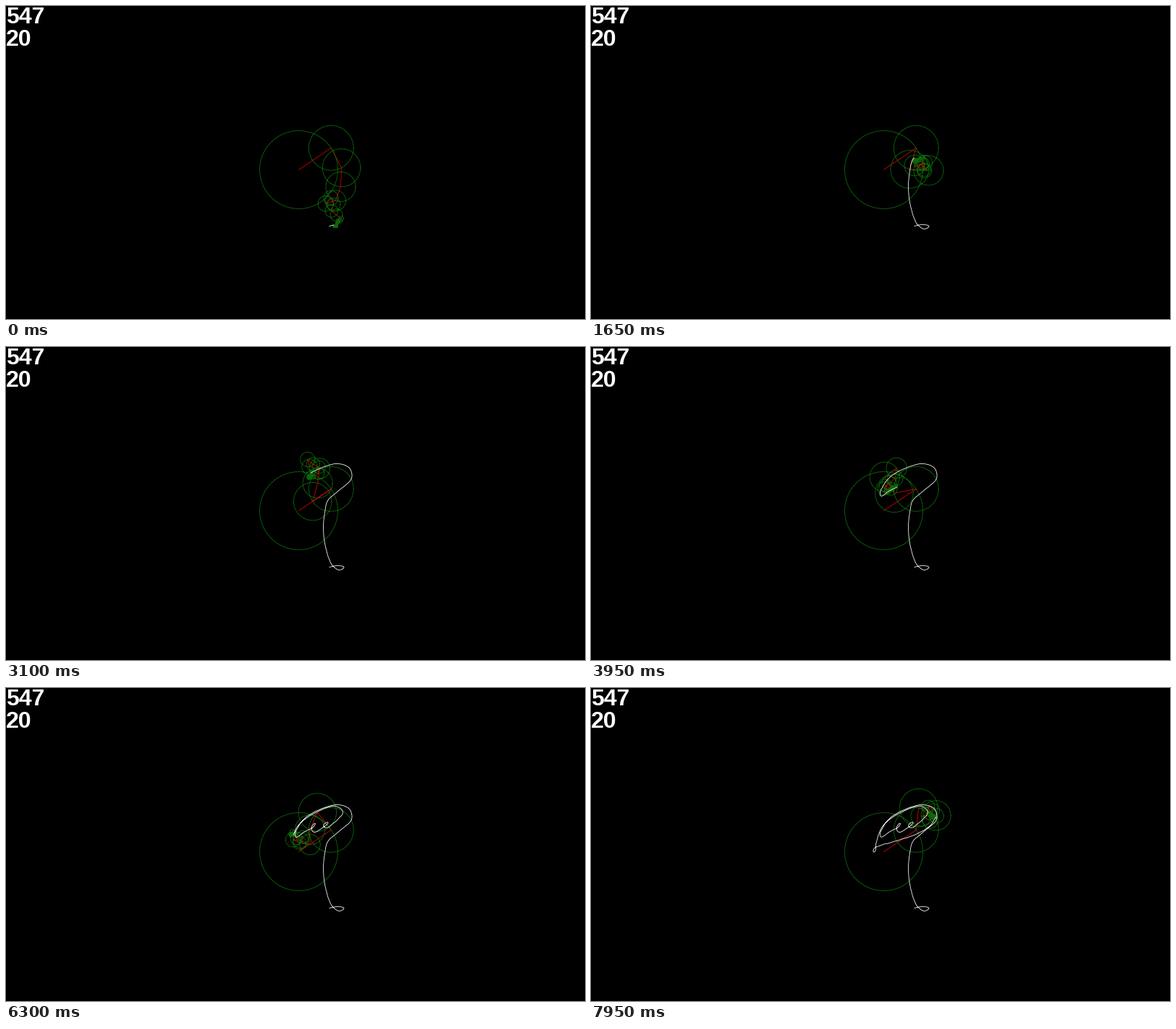
Recreate the animation shown at these times as a matplotlib script. Size 800x433 px, loop 8 s.

```python
import numpy as np
import matplotlib.pyplot as plt
from matplotlib.animation import FuncAnimation

W, H, DPI = 800, 433, 100
FRAMES, STEP_MS = 160, 50
PX = 72 / DPI
ORDER = 80                        # highest frequency kept
ORIGIN = 404 + 226j
START, END = np.radians([-2.1, 214])    # arm angles where the pen path lies

# Key points of the pen stroke, walked at constant speed.
STROKE = [
    (446, 304), (457, 302), (467, 304), (460, 308), (450, 301), (441, 276),
    (438, 250), (440, 228), (444, 212), (457, 200), (477, 181), (474, 167),
    (458, 161), (432, 168), (411, 181), (399, 201), (400, 206), (411, 199),
    (425, 191), (427, 186), (422, 192), (424, 199), (441, 190), (445, 185),
    (438, 189), (441, 193), (455, 184), (465, 171), (455, 163), (425, 173),
    (403, 190), (395, 208), (391, 227), (389, 225), (393, 220), (418, 212),
    (448, 202), (468, 190), (476, 178)]

# Longest arms: frequency -> (length, start angle in degrees)
ARMS = {1: (30, 60), -2: (26.5, 91.5), 2: (20.5, 113), -4: (14, 162)}


def spline(p, samples=12):
    """Smooth centripetal curve through complex points."""
    h = np.sqrt(np.abs(np.diff(p)))
    m = np.gradient(p, np.append(0, np.cumsum(h)))
    t = np.arange(samples)[:, None] / samples
    curve = ((2*t**3 - 3*t**2 + 1) * p[:-1] + (t**3 - 2*t**2 + t) * h * m[:-1]
             + (3*t**2 - 2*t**3) * p[1:] + (t**3 - t**2) * h * m[1:])
    return np.append(curve.T.ravel(), p[-1])


def fit_arms():
    """Fourier terms that follow the stroke and keep the longest arms."""
    z = spline(np.array([complex(*p) for p in STROKE]))
    length = np.append(0, np.cumsum(np.abs(np.diff(z))))
    angle = START + (END - START) * length / length[-1]

    n = np.arange(-ORDER, ORDER + 1)
    mean = np.zeros(len(n), complex)
    tol = 8 / (1 + (n / 6)**2)**0.75
    mean[ORDER], tol[ORDER] = 45 - 30j, 0.3
    for k, (r, a) in ARMS.items():
        mean[k + ORDER] = r * np.exp(1j * np.radians(a))
        tol[k + ORDER] = 0.6

    basis = np.exp(1j * np.outer(angle, n)) / 0.5
    lhs = basis.conj().T @ basis + np.diag(1 / tol**2)
    rhs = basis.conj().T @ ((z - ORIGIN) / 0.5) + mean / tol**2
    coef = np.linalg.solve(lhs, rhs)
    main = [0, *ARMS]
    rest = sorted(set(n) - set(main), key=lambda k: -abs(coef[k + ORDER]))
    freq = np.array(main + rest)
    return freq, coef[freq + ORDER]


FREQ, COEF = fit_arms()
RING = np.append(np.exp(2j * np.pi * np.arange(73) / 72), np.nan)


def set_line(line, z):
    line.set_data(z.real, z.imag)


fig = plt.figure(figsize=(W / DPI, H / DPI), dpi=DPI, facecolor="black")
ax = fig.add_axes([0, 0, 1, 1])
ax.set_xlim(-0.5, W - 0.5)
ax.set_ylim(H - 0.5, -0.5)
ax.axis("off")

arm_line, = ax.plot([], [], color="#d00000", lw=0.85 * PX)
rings, = ax.plot([], [], color="#0a680a", lw=0.85 * PX)
trail, = ax.plot([], [], color="white", lw=0.8 * PX)
for label, y in (("547", 23), ("20", 54.5)):
    ax.text(-0.5, y, label, color="white", family="Liberation Sans",
            weight="bold", size=32 * PX, va="baseline")


def draw(i):
    angle = END * i / (FRAMES - 1)
    z = ORIGIN + np.append(0, np.cumsum(COEF * np.exp(1j * FREQ * angle)))
    set_line(arm_line, z)
    set_line(rings, (z[:-1, None] + np.abs(COEF)[:, None] * RING).ravel())
    past = np.linspace(START, angle, 3 * i + 6)
    set_line(trail, ORIGIN + np.exp(1j * np.outer(past, FREQ)) @ COEF)
    return arm_line, rings, trail


anim = FuncAnimation(fig, draw, frames=FRAMES, interval=STEP_MS,
                     repeat=True, repeat_delay=0, blit=False)
plt.show()
```
